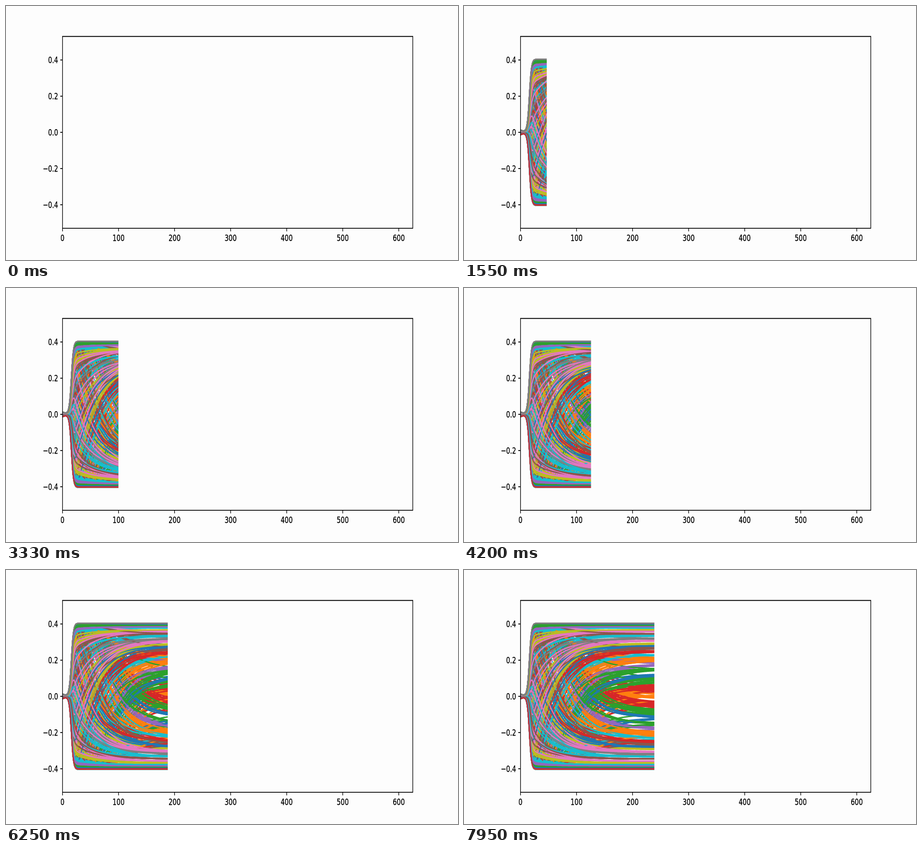
Animation of 998 by 561 pixels, one loop 8000 ms. Source, as an HTML page with a canvas:

```html
<!DOCTYPE html>
<html lang="en">
<head>
<meta charset="utf-8">
<title>Line plot</title>
<style>
  html, body { margin: 0; width: 100%; height: 100%; overflow: hidden; background: #fdfdfd; }
  canvas { display: block; width: 998px; height: 561px; }
</style>
</head>
<body>
<canvas id="plot" width="998" height="561"></canvas>
<script>
const LOOP = 8000, STEPS = 240;
const WIDTH = 998, HEIGHT = 561;
// The figure is 720 x 288 points, spread over the stage.
const SX = WIDTH / 720, SY = HEIGHT / 288;
const LEFT = 90, RIGHT = 648, TOP = 34.56, BOTTOM = 252;
const PEAK = 0.404;

const [BLUE, ORANGE, GREEN, RED, PURPLE, BROWN, PINK, GRAY, OLIVE, CYAN] =
  ['#1f77b4', '#ff7f0e', '#2ca02c', '#d62728', '#9467bd',
   '#8c564b', '#e377c2', '#7f7f7f', '#bcbd22', '#17becf'];

// Levels, mirrored around zero, on which the lines settle.
const bands = [
  [.012, ORANGE], [.04, RED], [.06, RED], [.083, GREEN], [.1, GREEN], [.12, BLUE],
  [.153, GREEN], [.178, PURPLE], [.2, ORANGE], [.213, ORANGE], [.229, CYAN],
  [.25, RED], [.265, BROWN], [.28, BLUE], [.293, OLIVE], [.308, PINK], [.32, GRAY],
  [.334, CYAN], [.346, BROWN], [.358, PINK], [.368, OLIVE], [.378, CYAN],
  [.385, PURPLE], [.392, GREEN], [.397, BLUE], [.401, RED], [.4035, GRAY]
];

const xOf = step => LEFT + step / 625 * (RIGHT - LEFT);
const yOf = value => (TOP + BOTTOM) / 2 - value / 1.06 * (BOTTOM - TOP);

let seed = 7;
function random() {
  seed = (seed * 1664525 + 1013904223) % 4294967296;
  return seed / 4294967296;
}

function pointContext(canvas) {
  const ctx = canvas.getContext('2d');
  ctx.scale(SX, SY);
  return ctx;
}

// Each line is a sine whose phase swings ever more slowly to its final angle.
function drawLine(ctx, { level, sign, color }) {
  const angle = Math.asin(level / PEAK);
  const inner = Math.cos(angle);
  const side = random() < 0.8 ? -1 : 1;
  const swing = side * 9 * (0.4 + 0.8 * random()) * inner ** 3;
  const riseAt = 15.6 + 5 * inner * random();
  const offset = (random() - 0.5) * 0.03 * inner;

  ctx.beginPath();
  for (let t = 0; t <= STEPS; t++) {
    const size = 0.013 * Math.exp(-t / 8) + PEAK / (1 + Math.exp((riseAt - t) / 1.9));
    const phase = angle + offset + swing * Math.exp(-t / 40);
    ctx.lineTo(xOf(t), yOf(sign * size * Math.sin(phase)));
  }
  ctx.strokeStyle = color;
  ctx.stroke();
}

function renderLines() {
  const layer = document.createElement('canvas');
  layer.width = WIDTH;
  layer.height = HEIGHT;
  const ctx = pointContext(layer);
  ctx.lineWidth = 1.5;
  ctx.lineJoin = 'round';

  // Outer lines tend to lie above inner ones.
  const lines = [];
  for (const [level, color] of bands) {
    for (let i = 0; i < 20; i++) {
      lines.push({ level, color, sign: i % 2 ? -1 : 1, depth: level + 0.25 * random() });
    }
  }
  lines.sort((a, b) => a.depth - b.depth);
  for (const line of lines) drawLine(ctx, line);
  return layer;
}

const ctx = pointContext(document.getElementById('plot'));
const lines = renderLines();

function label(text, x, y) {
  ctx.fillText(text, x, y);
  ctx.lineWidth = 0.2;
  ctx.strokeText(text, x, y);
}

function drawAxes() {
  ctx.strokeStyle = ctx.fillStyle = '#000';
  ctx.font = '10px "DejaVu Sans", sans-serif';
  ctx.beginPath();
  ctx.rect(LEFT, TOP, RIGHT - LEFT, BOTTOM - TOP);
  ctx.textAlign = 'center';
  for (let value = 0; value <= 600; value += 100) {
    const x = xOf(value);
    ctx.moveTo(x, BOTTOM);
    ctx.lineTo(x, BOTTOM + 3.5);
    label(value, x, BOTTOM + 14.5);
  }
  ctx.textAlign = 'right';
  for (let i = -2; i <= 2; i++) {
    const y = yOf(i / 5);
    ctx.moveTo(LEFT, y);
    ctx.lineTo(LEFT - 3.5, y);
    label((i / 5).toFixed(1).replace('-', '−'), LEFT - 7, y + 3.7);
  }
  ctx.lineWidth = 1;
  ctx.stroke();
}

// Three points are added every 100 ms, at 0, 30 and 50 ms.
function pointCount(time) {
  const rest = time % 100;
  return 3 * Math.floor(time / 100) + (rest >= 30) + (rest >= 50);
}

function draw(time) {
  ctx.fillStyle = '#fdfdfd';
  ctx.fillRect(0, 0, 720, 288);
  const count = pointCount(time);
  if (count > 1) {
    ctx.save();
    ctx.beginPath();
    ctx.rect(LEFT, TOP, xOf(count - 1) + 0.75 - LEFT, BOTTOM - TOP);
    ctx.clip();
    ctx.drawImage(lines, 0, 0, 720, 288);
    ctx.restore();
  }
  drawAxes();
}

const start = performance.now();
function tick() {
  draw((performance.now() - start) % LOOP);
  requestAnimationFrame(tick);
}
tick();
</script>
</body>
</html>
```
